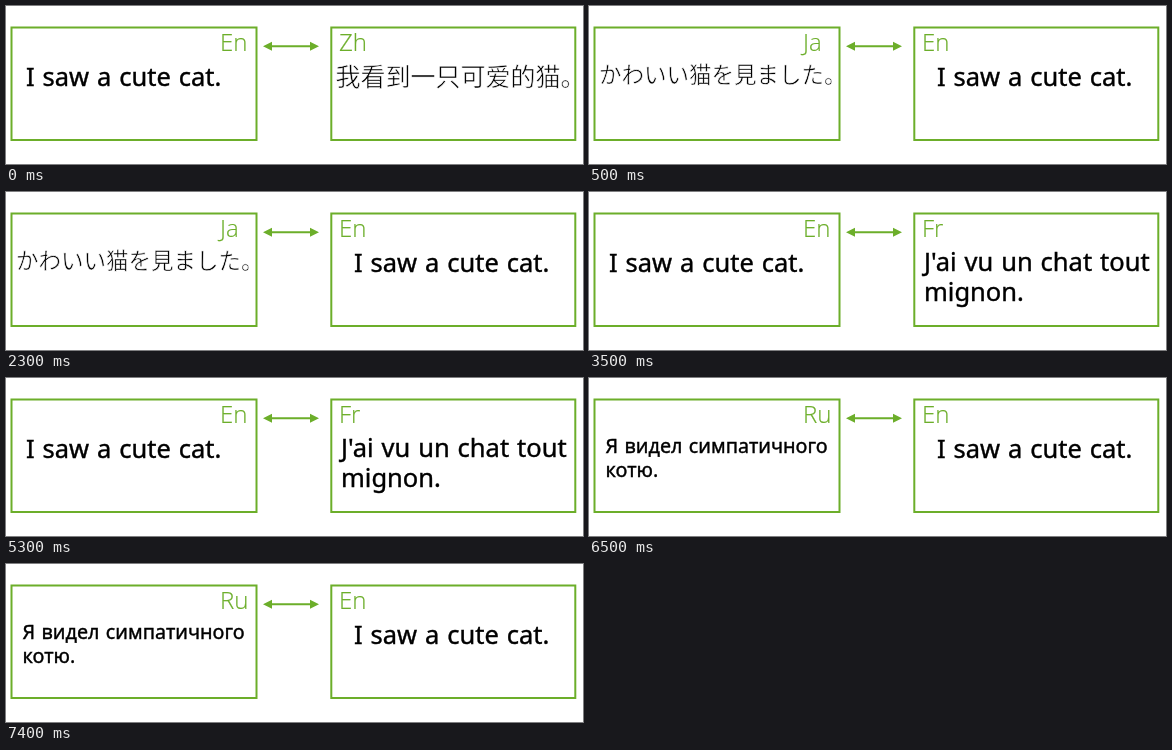
These frames come from a looping animation (577 px wide and 158 px high, 8000 ms). An HTML page:

```html
<!DOCTYPE html>
<html lang="en">
<head>
<meta charset="utf-8">
<title>Translation pairs</title>
<style>
  html, body { margin: 0; width: 100%; height: 100%; overflow: hidden; background: #fff; }
  svg { display: block; width: 577px; height: 158px; }
  .box { fill: none; stroke: #6cae2a; stroke-width: 2; }
  .arrow { fill: #6cae2a; }
  .label { font: 300 24px "Open Sans", sans-serif; fill: #6cae2a; stroke: #6cae2a; stroke-width: .2px; }
  .latin, .cyrillic { word-spacing: 1.3px; stroke: #000; stroke-width: .4px; }
  .latin { font: 25.5px "Noto Sans", sans-serif; }
  .cyrillic { font: 19.7px "Noto Sans", sans-serif; }
  /* A white outline thins the strokes */
  .zh, .ja { stroke: #fff; stroke-width: .6px; }
  .zh { font: 300 25px "Noto Sans CJK SC", "Noto Sans CJK", sans-serif; }
  .ja { font: 300 22.5px "Noto Sans CJK JP", "Noto Sans CJK", sans-serif; }
</style>
</head>
<body>
<svg viewBox="0 0 577 158">
  <rect class="box" x="5.5" y="21.5" width="245" height="112.5"/>
  <rect class="box" x="325.3" y="21.5" width="244" height="112.5"/>
  <path class="arrow" d="M257 40.2l9-4.5v3.5h38v-3.5l9 4.5-9 4.5v-3.5h-38v3.5z"/>
  <g id="words"></g>
</svg>
<script>
const LOOP = 8000;
const words = document.getElementById('words');
const english = { label: 'En', style: 'latin', lines: ['I saw a cute cat.'], y: 79.5 };

// Each step: start time, left sentence, right sentence
const steps = [
  [0, { ...english, x: 20 },
    { label: 'Zh', style: 'zh', lang: 'zh-CN', lines: ['我看到一只可爱的猫。'], x: 329.5, y: 80 }],
  [500, { label: 'Ja', style: 'ja', lang: 'ja', lines: ['かわいい猫を見ました。'], x: 10, y: 77 },
    { ...english, x: 348 }],
  [3500, { ...english, x: 20 },
    { label: 'Fr', style: 'latin', lang: 'fr', lines: ["J'ai vu un chat tout", 'mignon.'], x: 335, y: 79, gap: 30 }],
  [6500, { label: 'Ru', style: 'cyrillic', lang: 'ru', lines: ['Я видел симпатичного', 'котю.'], x: 16.5, y: 74.5, gap: 24 },
    { ...english, x: 348 }]
];

function addText(group, text, x, y, style, lang) {
  const el = document.createElementNS('http://www.w3.org/2000/svg', 'text');
  el.setAttribute('x', x);
  el.setAttribute('y', y);
  el.setAttribute('class', style);
  if (lang) el.setAttribute('lang', lang);
  el.textContent = text;
  group.append(el);
}

function addSide(group, side, labelX) {
  addText(group, side.label, labelX, 45.3, 'label');
  side.lines.forEach((line, i) =>
    addText(group, line, side.x, side.y + i * (side.gap || 0), side.style, side.lang));
}

const groups = steps.map(([, left, right]) => {
  const group = document.createElementNS('http://www.w3.org/2000/svg', 'g');
  addSide(group, left, 214);
  addSide(group, right, 333);
  words.append(group);
  return group;
});

const start = performance.now();
function draw(now) {
  const t = Math.max(0, now - start) % LOOP;
  const current = steps.findLastIndex(([time]) => time <= t);
  groups.forEach((group, i) => group.setAttribute('visibility', i === current ? 'visible' : 'hidden'));
  requestAnimationFrame(draw);
}
draw(start);
</script>
</body>
</html>
```
